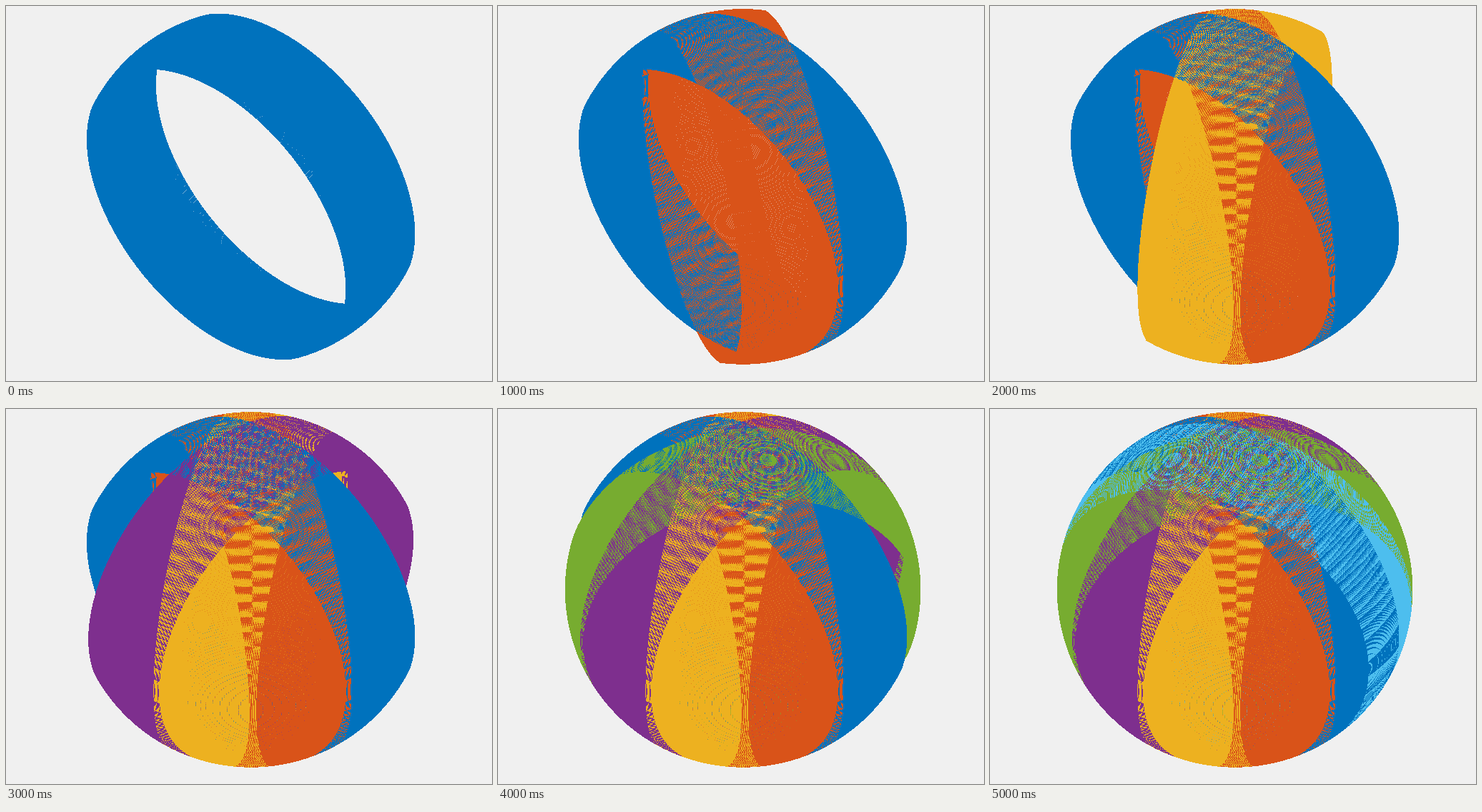
An HTML page with a canvas for the animation above (6 s loop, 680 px wide and 525 px high).

```html
<!DOCTYPE html>
<html lang="en">
<head>
<meta charset="utf-8">
<title>Orbit bands</title>
<style>
  html, body { margin: 0; width: 100%; height: 100%; overflow: hidden; background: #f0f0f0; }
  canvas { display: block; width: 680px; height: 525px; }
</style>
</head>
<body>
<canvas id="stage" width="680" height="525"></canvas>
<script>
const W = 680, H = 525, CX = 342.6, CY = 252.9, R = 248.8;
const STEP_MS = 1000;
const BACK = [240, 240, 240];
const COLORS = [
  [0, 114, 189], [217, 83, 25], [237, 177, 32],
  [126, 47, 142], [119, 172, 48], [77, 190, 238]
];
const rad = deg => deg * Math.PI / 180;
const TILT = rad(42.8), HALF = rad(17.3);   // camera elevation, band half width
const CHORDS = 72, LINES = 104, PEN = 0.68; // PEN: half a line's width in px
const PITCH = 2 * HALF / (LINES - 1);
const SAG = R * (2 * Math.PI / CHORDS) ** 2 / 2;
const EDGE = Math.sin(HALF + PITCH * 4);
const clamp = (v, lo, hi) => Math.min(hi, Math.max(lo, v));
const dot = (a, x, y, z) => a[0] * x + a[1] * y + a[2] * z;

// World (right, toward camera, pole) to screen (right, up, depth).
const view = (r, a, p) => [
  r,
  p * Math.cos(TILT) - a * Math.sin(TILT),
  p * Math.sin(TILT) + a * Math.cos(TILT)
];
const pole = view(0, 0, 1);
const bands = COLORS.map((color, k) => {
  const psi = rad(49.7 - 32.7 * k), c = Math.cos(psi), s = Math.sin(psi);
  return { color, axis: view(c, -s, 0), node: view(s, c, 0) };
});

// The band's nearest line at a point of the sphere: its depth relative to
// the sphere in px, and whether the point falls between two lines.
function probe(band, x, y, z) {
  const n = band.axis, t = dot(n, x, y, z);
  if (Math.abs(t) > EDGE) return null;

  const rho2 = 1 - t * t, rho = Math.sqrt(rho2);
  const gx = (n[0] - n[2] * x / z) / rho, gy = (n[1] - n[2] * y / z) / rho;
  const grad = Math.hypot(gx, gy), gapPx = PITCH * R / grad;
  const slope = -(x * gx + y * gy) / (z * grad);
  const line = (Math.asin(t) + HALF) / PITCH, reach = PEN / gapPx;
  const pick = slope > 0 ? Math.floor(line + reach) : Math.ceil(line - reach);
  const off = (clamp(pick, 0, LINES - 1) - line) * gapPx;
  const gap = Math.abs(off) > PEN;
  if (gap && (line < 0 || line > LINES - 1)) return null;

  const turn = Math.atan2(dot(pole, x, y, z), dot(band.node, x, y, z)) / (2 * Math.PI);
  const u = (turn + 1) * CHORDS, mid = u - Math.floor(u) - 0.5;
  const sag = SAG * rho2 * (mid * mid - 0.25);
  return { color: band.color, depth: sag / z + slope * off, gap };
}

// Blend the nearest layers until one has no gap.
function shade(x, y, count) {
  const z = Math.sqrt(Math.max(1e-6, 1 - x * x - y * y));
  let out = [0, 0, 0], weight = 1;
  for (const side of [z, -z]) {
    const hits = [];
    for (let k = 0; k < count; k++) {
      const hit = probe(bands[k], x, y, side);
      if (hit) hits.push(hit);
    }
    hits.sort((a, b) => b.depth - a.depth);
    for (const hit of hits) {
      const part = hit.gap ? weight / 2 : weight;
      out = out.map((v, i) => v + hit.color[i] * part);
      weight -= part;
      if (!weight) return out;
    }
  }
  return out.map((v, i) => v + BACK[i] * weight);
}

function render(count) {
  const img = new ImageData(W, H);
  for (let py = 0, at = 0; py < H; py++) {
    for (let px = 0; px < W; px++, at += 4) {
      const x = (px + 0.5 - CX) / R, y = (CY - py - 0.5) / R;
      const rgb = x * x + y * y <= 1 ? shade(x, y, count) : BACK;
      img.data[at] = rgb[0];
      img.data[at + 1] = rgb[1];
      img.data[at + 2] = rgb[2];
      img.data[at + 3] = 255;
    }
  }
  return img;
}

const ctx = document.getElementById('stage').getContext('2d');
const stages = COLORS.map((_, k) => render(k + 1));
const start = performance.now();
let shown = -1;

function draw() {
  const k = Math.floor((performance.now() - start) / STEP_MS) % stages.length;
  if (k !== shown) ctx.putImageData(stages[shown = k], 0, 0);
  requestAnimationFrame(draw);
}
draw();
</script>
</body>
</html>
```
